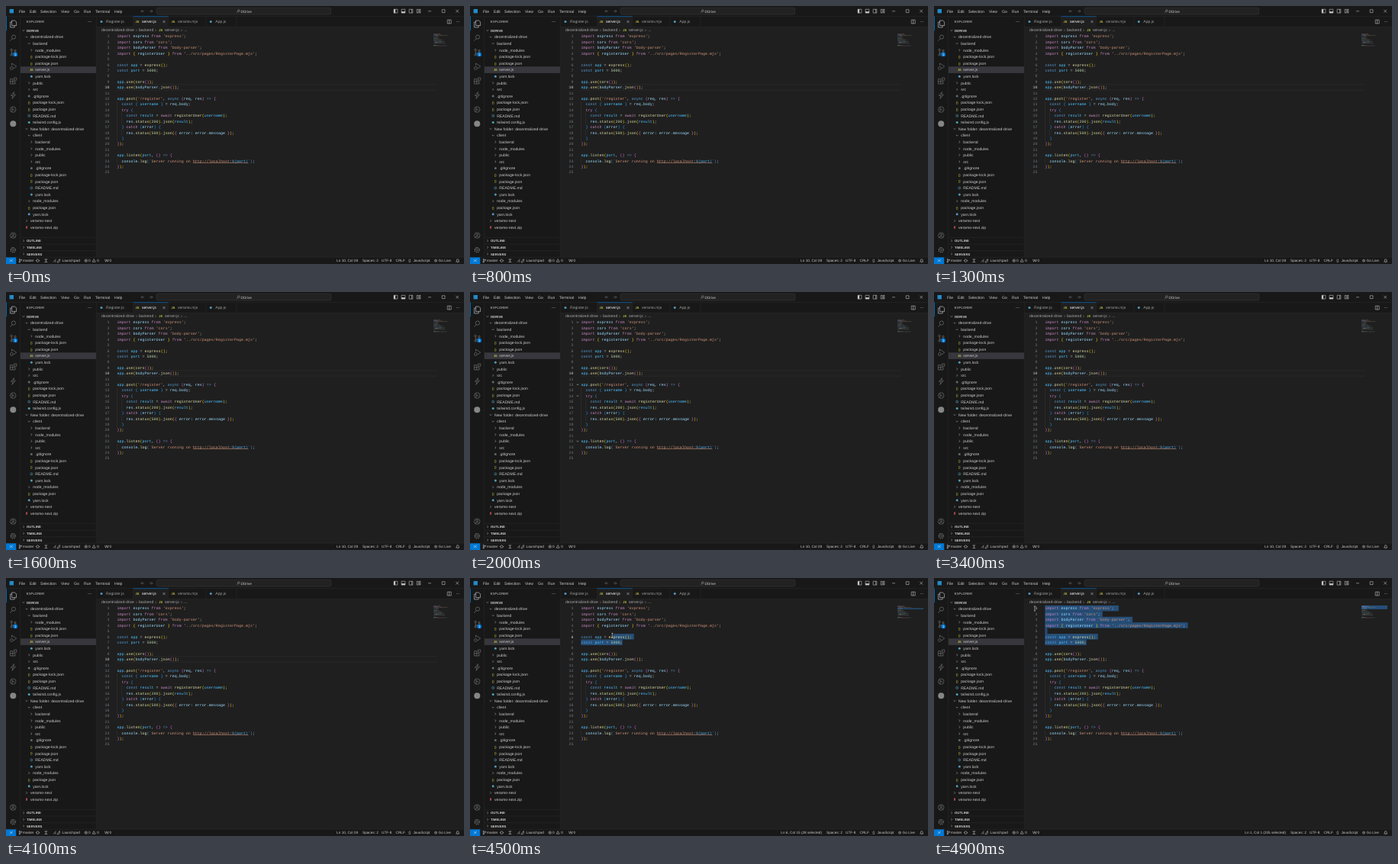
These frames come from a looping animation (600x338 px, 5 s). An HTML page:

```html
<!DOCTYPE html>
<html lang="en">
<head>
<meta charset="utf-8">
<title>Code editor</title>
<style>
  html, body { margin: 0; width: 100%; height: 100%; overflow: hidden; background: #181818; }
  svg { display: block; width: 600px; height: 338px; }
  text {
    font: 5.08px "Liberation Sans", Arial, sans-serif;
    fill: #ccc; white-space: pre; text-rendering: geometricPrecision;
  }
  .small { font-size: 4.3px; }
  .bold { font-size: 4.3px; font-weight: bold; }
  .status { font-size: 4.69px; }
  .code { font: 5.03px "Liberation Mono", "DejaVu Sans Mono", monospace; }
  .js { font-size: 4px; font-weight: bold; fill: #cbcb41; }
  .line { fill: none; stroke-width: .55; }
</style>
</head>
<body>
<svg id="stage" viewBox="0 0 600 338"></svg>
<script>
const NS = 'http://www.w3.org/2000/svg';
const stage = document.getElementById('stage');
const LOOP = 5000, STEP = 100;
const ROW = 8.6, LINE = 7.42, CHAR = 3.018, CODE_X = 145.4, CODE_Y = 39.7;

function add(tag, attrs, parent = stage) {
  const el = document.createElementNS(NS, tag);
  for (const key in attrs) el.setAttribute(key, attrs[key]);
  parent.appendChild(el);
  return el;
}
const rect = (x, y, width, height, fill, parent) => add('rect', { x, y, width, height, fill }, parent);
const path = (d, stroke = '#ccc', parent) => add('path', { d, stroke, class: 'line' }, parent);
const dot = (cx, cy, r, fill) => add('circle', { cx, cy, r, fill });
const ring = (cx, cy, r, stroke = '#868686') => add('circle', { cx, cy, r, stroke, class: 'line' });
// y is the vertical middle of the text
function label(str, x, y, cls = '', fill, anchor = 'start', parent) {
  const el = add('text', { x, y: y + 1.7, class: cls, 'text-anchor': anchor }, parent);
  if (fill) el.style.fill = fill;
  el.textContent = str;
  return el;
}
const chevron = (x, y, open, color = '#bbb', parent) => path(open
  ? `M${x - 1.4} ${y - .7}l1.4 1.4l1.4-1.4`
  : `M${x - .7} ${y - 1.4}l1.4 1.4l-1.4 1.4`, color, parent);
const dots = (x, y) => [-1.6, 0, 1.6].forEach(d => dot(x + d, y, .4, '#ccc'));

function fileIcon(type, x, y) {
  if (type === 'json') label('{}', x, y - .2, 'small', '#cbcb41', 'middle');
  else if (type === 'js') label('JS', x, y, 'js', '', 'middle');
  else if (type === 'md') { ring(x, y, 1.6, '#519aba'); rect(x - .25, y - .8, .5, 1.7, '#519aba'); }
  else if (type === 'zip') rect(x - 1, y - 1.6, 2, 3.2, '#b0474b');
  else dot(x, y, 1.5, { git: '#5b6b74', yarn: '#519aba', wind: '#4aa3b5', react: '#519aba' }[type]);
}

// Panels
rect(0, 0, 600, 338, '#181818');
rect(118.5, 27.3, 481.5, 301.7, '#1f1f1f');
path('M0 13.7H600M18.6 13.7V329M118.3 13.7V329M118.3 27.3H600M0 329.2H600', '#2b2b2b');

// Title bar
rect(4.6, 4, 5.4, 5.4, '#2489ca');
[['File', 17], ['Edit', 31], ['Selection', 45], ['View', 72], ['Go', 89], ['Run', 102], ['Terminal', 117], ['Help', 142]]
  .forEach(([name, x]) => label(name, x, 6.9));
path('M181 6.8h-4m1.7-1.7l-1.7 1.7l1.7 1.7M188 6.8h4m-1.7-1.7l1.7 1.7l-1.7 1.7', '#777');
add('rect', { x: 197.3, y: 2.2, width: 228.5, height: 8.8, rx: 2, fill: '#222', stroke: '#3c3c3c', 'stroke-width': .5 });
ring(304.8, 6.2, 1.3, '#aaa');
path('M303.9 7.2l-1.5 1.6', '#aaa');
label('DDrive', 307.5, 6.9, 'status');
[510.5, 520.5, 530.5].forEach(x => path(`M${x - 2.4} 4.3h4.8v4.8h-4.8z`));
rect(508.1, 4.3, 2, 4.8, '#ccc');
rect(518.1, 7.2, 4.8, 1.9, '#ccc');
path('M531.5 4.3v4.8M538.2 4.4h2v4.6h-2zM541.3 4.4h1.7v1.7h-1.7zM541.3 7.3h1.7v1.7h-1.7z');
path('M553 6.8h4M571.2 4.8h3.8v3.8h-3.8zM589.3 4.8l3.8 3.8m0-3.8l-3.8 3.8');

// Activity bar
rect(0, 13.7, .8, 18.7, '#0078d4');
path('M7.6 19h4l2 2v4.6h-6zM7.6 21h-2v7h5.6v-2.4', '#e4e4e4');
ring(10, 40.6, 2.6);
path('M8.2 42.6l-2.8 3.2', '#868686');
[[7.2, 57.4], [7.2, 64], [12, 58.6]].forEach(([x, y]) => ring(x, y, 1.2));
path('M7.2 58.6v4.2M12 59.8q0 2.2-4.8 2.2', '#868686');
dot(12.2, 63.4, 2.9, '#0078d4');
label('1', 12.2, 63.4, 'small', '#fff', 'middle');
path('M7.6 78v-3l6.2 4.2l-4 2.8', '#868686');
ring(7.4, 81.4, 1.9);
path('M5.6 95.6h3.2v3.2h3.2v3.2h-6.4zM5.6 98.8h3.2v3.2M10.6 94h3.2v3.2h-3.2z', '#868686');
path('M10.6 112.6l-4.2 4.8h2.8l-1.2 4l4.4-5.2h-2.9z', '#868686');
ring(9.3, 135.6, 3.7);
path('M8 133v5.2M8 135q3 0 3 2', '#868686');
dot(9.3, 154.3, 4, '#868686');
ring(9.3, 300.6, 3.7);
ring(9.3, 299.6, 1.3);
path('M6.7 303.2q2.6-3.2 5.2 0', '#868686');
ring(9.3, 319.6, 1.3);
add('circle', { cx: 9.3, cy: 319.6, r: 3.1, stroke: '#868686', fill: 'none', 'stroke-width': 1.1, 'stroke-dasharray': '1.3 1.13' });

// Explorer
label('EXPLORER', 26.8, 20.5, 'small');
dots(109.5, 20.5);
label('DDRIVE', 27, 32, 'bold');
chevron(23, 32, true);
rect(18.9, 79.3, 99.2, ROW, '#37373d');
// level, kind (open folder "+", closed folder ">", or file type), name
const tree = `1 + decentralized-drive
2 + backend
3 > node_modules
3 json package-lock.json
3 json package.json
3 js server.js
3 yarn yarn.lock
2 > public
2 > src
2 git .gitignore
2 json package-lock.json
2 json package.json
2 md README.md
2 wind tailwind.config.js
1 + New folder: decentralized-drive
2 + client
3 > backend
3 > node_modules
3 > public
3 > src
3 git .gitignore
3 json package-lock.json
3 json package.json
3 md README.md
3 yarn yarn.lock
2 > node_modules
2 json package.json
2 yarn yarn.lock
1 > veramo-next
1 zip veramo-next.zip`;
tree.split('\n').forEach((row, i) => {
  const [, level, kind, name] = row.match(/(\d) (\S+) (.*)/);
  const x = 28.9 + level * 3.15, y = 32 + (i + 1) * ROW;
  label(name, x, y);
  if (kind === '+' || kind === '>') chevron(x - 5, y, kind === '+');
  else fileIcon(kind, x - 5, y);
});
['OUTLINE', 'TIMELINE', 'SERVERS'].forEach((name, i) => {
  const y = 307.7 + i * ROW;
  path(`M18.8 ${y - 4.3}H118`, '#2b2b2b');
  label(name, 27, y, 'bold');
  chevron(23, y, false);
});

// Tabs and breadcrumbs
rect(166.7, 13.7, 46, 14, '#1f1f1f');
rect(166.7, 13.5, 46, .6, '#0078d4');
path('M166.6 13.7V27.3M212.7 13.7V27.3M262 13.7V27.3M302 13.7V27.3', '#2b2b2b');
[['react', 'Register.js', 131], ['js', 'server.js', 178], ['js', 'veramo.mjs', 225], ['react', 'App.js', 274.3]]
  .forEach(([type, name, x], i) => {
    fileIcon(type, x - 6, 20.6);
    label(name, x, 20.6, '', i === 1 ? '#fff' : '#9d9d9d');
  });
path('M205.5 19.1l3 3m0-3l-3 3');
path('M578.2 18.2h5v4.8h-5zM580.7 18.2v4.8');
dots(592, 20.6);
const crumb = '#a9a9a9';
label('decentralized-drive', 125, 31.6, '', crumb);
label('backend', 174, 31.6, '', crumb);
label('server.js', 208, 31.6, '', crumb);
label('...', 233.2, 31.6, '', crumb);
[171, 196, 230].forEach(x => chevron(x, 31.8, false, '#888'));
fileIcon('js', 202.8, 31.6);

// Code
const source = `import express from 'express'; 
import cors from 'cors';
import bodyParser from 'body-parser';
import { registerUser } from '../src/pages/RegisterPage.mjs';

const app = express();
const port = 5000;

app.use(cors());
app.use(bodyParser.json());

app.post('/register', async (req, res) => {
  const { username } = req.body;
  try {
    const result = await registerUser(username);
    res.status(200).json(result);
  } catch (error) {
    res.status(500).json({ error: error.message });
  }
});

app.listen(port, () => {
  console.log(\`Server running on http://localhost:\${port}\`);
});
`.split('\n');

const rules = [
  [/^('[^']*'|`Server running on |http:\/\/localhost:|`)/, '#ce9178'],
  [/^(\$\{|\}(?=`))/, '#569cd6'],
  [/^(import|from|await|try|catch)\b/, '#c586c0'],
  [/^((const|async)\b|=>)/, '#569cd6'],
  [/^\d+/, '#b5cea8'],
  [/^[a-z]\w*(?=\()/i, '#dcdcaa'],
  [/^(app|port|result|username)\b/, '#4fc1ff'],
  [/^[a-z]\w*/i, '#9cdcfe'],
  [/^[(){}]/, null],
  [/^(\s+|.)/, '#ccc']
];
const bracketColors = ['#ffd700', '#da70d6', '#179fff'];
let depth = 0;
function tokenColor(token, color) {
  if (color) return color;
  if ('({'.includes(token)) return bracketColors[depth++ % 3];
  return bracketColors[--depth % 3];
}
const lineY = i => CODE_Y + i * LINE;

const currentLine = path(`M145 ${lineY(9) - 3.8}H565M145 ${lineY(9) + 3.6}H565`, '#303030');
const selection = add('g', {});
path(`M145.7 ${lineY(12) - 3.7}V${lineY(19) - 3.7}M145.7 ${lineY(22) - 3.7}v${LINE}`
  + `M151.7 ${lineY(14) - 3.7}v${LINE * 2}M151.7 ${lineY(17) - 3.7}v${LINE}`, '#383838');

const numbers = source.map((text, i) => {
  const number = label(i + 1, 135.5, lineY(i), 'code', '#6e7681', 'end');
  const row = label('', CODE_X, lineY(i), 'code');
  let x = 560, rest = text;
  while (rest) {
    const [rule, base] = rules.find(([r]) => r.test(rest));
    const token = rest.match(rule)[0];
    const fill = tokenColor(token, base);
    add('tspan', { fill }, row).textContent = token;
    const width = token.length * .3;
    if (token.trim()) rect(x, 36.4 + i * .7, width, .42, fill).setAttribute('opacity', .5);
    x += width;
    rest = rest.slice(token.length);
  }
  return number;
});
const linkX = CODE_X + 33 * CHAR - 2 * CHAR;
path(`M${linkX + 2 * CHAR - CHAR * 0} ${lineY(22) + 2.6}h${CHAR * 24}`, '#ce9178')
  .setAttribute('stroke-width', .4);

const folds = add('g', {});
[0, 11, 13, 21].forEach(i => chevron(141, lineY(i), true, '#c5c5c5', folds));
const pointer = path('M-1-3h2M0-3v6M-1 3h2', '#eee');

// Status bar
rect(0, 329.3, 13.3, 8.7, '#0078d4');
path('M5 332.2l1.6 1.6l-1.6 1.6M8.6 331.6l-1.6 1.6l1.6 1.6', '#fff');
ring(17.7, 332, .7, '#ccc');
ring(17.7, 335.4, .7, '#ccc');
ring(20, 332.6, .7, '#ccc');
path('M17.7 332.7v2M20 333.3q0 1-2.3 1');
label('master', 22, 333.6, 'status');
ring(41.5, 333.6, 1.7, '#ccc');
path('M38.9 333.6h1.2M43 333.6h1.3M50.4 332h4M50.4 335.4h4M52.4 331.6v4');
path('M62 335.4l3.4-3.8M64.6 335.6l.4-2.2M67 335.6l3.2-4.2l.4 2.8l-2 1.6z');
label('Launchpad', 73.6, 333.6, 'status');
ring(104.8, 333.6, 1.7, '#ccc');
path('M104 332.8l1.6 1.6m0-1.6l-1.6 1.6M113.2 335.2l2-3.6l2 3.6z');
label('0', 108, 333.6, 'status');
label('0', 119.3, 333.6, 'status');
path('M129.4 331.8l1.3 3.4l1.3-3.4l1.3 3.4l1.1-3.4');
label('0', 135.4, 333.6, 'status');
const position = label('', 461, 333.6, 'status', '', 'end');
[['Spaces: 2', 467], ['UTF-8', 492], ['CRLF', 510.5], ['{}', 527.3], ['JavaScript', 533.5], ['Go Live', 566.6]]
  .forEach(([text, x]) => label(text, x, 333.6, 'status'));
ring(563, 333.6, 1.5, '#ccc');
dot(563, 333.6, .5, '#ccc');
path('M589.6 335q.8-.6.8-2q0-1.5 1.3-1.5q1.3 0 1.3 1.5q0 1.4.8 2zM591.2 335.8h1');

const lerp = (a, b, p) => a + (b - a) * p;
const clamp = (v, lo, hi) => Math.max(lo, Math.min(hi, v));
const ramp = (t, from, to) => clamp((t - from) / (to - from), 0, 1);

// Drag upwards from the end of line 7 to the start of line 1
function drawSelection(t) {
  selection.replaceChildren();
  const p = ramp(t, 4400, 4900);
  const x = lerp(200, 132, p), y = lerp(84.2, 40, p);
  pointer.setAttribute('transform', `translate(${x} ${y})`);
  const line = Math.round((y - CODE_Y) / LINE);
  const col = clamp(Math.round((x - CODE_X) / CHAR), 0, source[line].length);
  let count = 0;
  for (let i = line; i <= 6; i++) {
    const start = i === line ? col : 0;
    const chars = source[i].length - start;
    count += chars + (i < 6 ? 2 : 0);
    const width = (chars + (i < 6 ? 1 : 0)) * CHAR;
    rect(CODE_X + start * CHAR, lineY(i) - 3.75, width, LINE + .05, '#264f78', selection);
  }
  if (count) rect(560, 36 + line * .7, 34, (7 - line) * .7, '#264f78', selection);
  position.textContent = `Ln ${line + 1}, Col ${col + 1}` + (count ? ` (${count} selected)` : '');
  return line;
}

let shown = -1;
function frame(now) {
  const t = Math.floor(now % LOOP / STEP) * STEP;
  if (t !== shown) {
    shown = t;
    const dragging = t >= 4400;
    let active = 9;
    if (dragging) active = drawSelection(t);
    else {
      selection.replaceChildren();
      position.textContent = 'Ln 10, Col 28';
    }
    numbers.forEach((n, i) => n.style.fill = i === active ? '#ccc' : '#6e7681');
    currentLine.style.display = dragging ? 'none' : '';
    pointer.style.display = dragging ? '' : 'none';
    folds.style.opacity = ramp(t, 1800, 2000) * (1 - ramp(t, 2500, 2900));
  }
  requestAnimationFrame(frame);
}
frame(performance.now());
</script>
</body>
</html>
```
